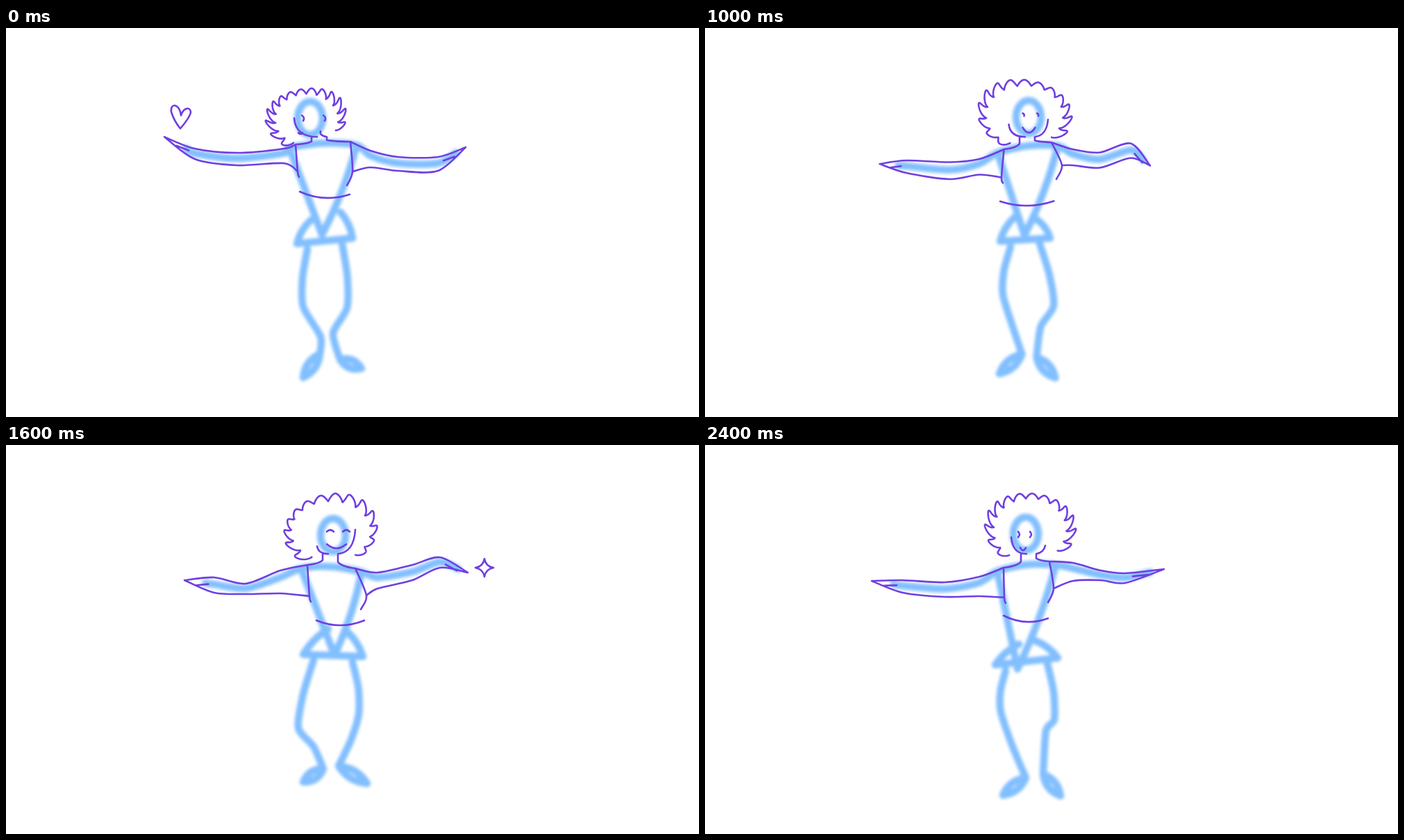
An HTML page with a canvas for the animation above (2600 ms loop, 998x561 px).

```html
<!DOCTYPE html>
<html lang="en">
<head>
<meta charset="utf-8">
<title>Dancer</title>
<style>
html, body { margin: 0; width: 100%; height: 100%; overflow: hidden; background: #fff; }
canvas { display: block; }
</style>
</head>
<body>
<canvas id="stage" width="998" height="561"></canvas>
<script>
const ctx = document.getElementById('stage').getContext('2d');
const STEP = 200, STEPS = 13, CURLS = 14, CHIN = 157;
const BLUE = '#82bfff', PURPLE = '#6f3fe0';
const HEART = new Path2D('M252,126 C250,108 236,108 238,121 Q242,134 251,145 Q264,130 266,122 C266,113 256,114 252,126');

// Rig of one pose. hair: x, y, rx, ry, first and last angle; eyes: two x, y, half width, half height;
// mouth: x, y, half width, sag; waist: two ends, sag; leg: knee, calf, ankle, toe;
// arm: from the shoulder out, where each section is x, top, bottom.
const POSES = [{
  head: [438, 130], hair: [433, 132, 50, 42, 115, 385], neck: 451,
  eyes: [427, 458, 130, 1, 4], mouth: [424, 151, 3, 2], jaw: [[415, 130], [453, 149]],
  waist: [[423, 236], [495, 240], 7], point: [455, 298],
  skirt: [[439, 277], [419, 311], [499, 303], [482, 266]],
  legs: [[[428, 402], [453, 445], [452, 470], [428, 504]], [[491, 404], [471, 440], [481, 478], [512, 491]]],
  arms: [
    { collar: [417, 168], pit: [420, 207], parts: [[400, 174, 195], [333, 180, 198], [272, 174, 189]], tip: [228, 157] },
    { collar: [496, 164], pit: [499, 207], parts: [[525, 177, 201], [565, 186, 206], [622, 186, 206]], tip: [662, 172] }]
}, {
  head: [447, 130], hair: [455, 130, 60, 46, 126, 417], neck: 463,
  eyes: [446, 471, 129, 5, 0], mouth: [461, 147, 6, 3], jaw: [[430, 128], [482, 146]],
  waist: [[416, 239], [493, 252], 15], point: [454, 294],
  skirt: [[440, 268], [421, 317], [502, 313], [476, 264]],
  legs: [[[428, 380], [447, 422], [456, 475], [421, 505]], [[502, 380], [490, 412], [481, 481], [505, 505]]],
  arms: [
    { collar: [425, 174], pit: [415, 208], parts: [[375, 168, 188], [325, 172, 194], [280, 179, 204]], tip: [253, 208] },
    { collar: [504, 182], pit: [507, 213], parts: [[530, 184, 203], [570, 188, 207], [605, 190, 206]], tip: [655, 170] }]
}, {
  head: [461, 127], hair: [455, 126, 62, 47, 113, 398], neck: 463,
  eyes: [446, 471, 124, 1, 0], mouth: [461, 142, 6, 7], jaw: [[430, 131], [489, 136]],
  waist: [[421, 249], [501, 249], 2], point: [453, 301],
  skirt: [[437, 277], [421, 309], [497, 306], [470, 271]],
  legs: [[[430, 377], [447, 420], [457, 465], [432, 493]], [[505, 394], [488, 428], [485, 478], [505, 504]]],
  arms: [
    { collar: [430, 170], pit: [424, 213], parts: [[395, 187, 207], [355, 192, 215], [290, 188, 207]], tip: [251, 197] },
    { collar: [499, 162], pit: [511, 195], parts: [[530, 179, 205], [565, 195, 213], [622, 190, 203]], tip: [662, 212] }]
}, {
  head: [471, 130], hair: [465, 126, 58, 49, 111, 415], neck: 465,
  eyes: [471, 487, 126, 1, 4], mouth: [472, 145, 12, 8], jaw: [[445, 147], [499, 128]],
  waist: [[429, 251], [504, 250], 11], point: [467, 297],
  skirt: [[455, 268], [429, 306], [497, 300], [484, 280]],
  legs: [[[428, 392], [436, 432], [456, 476], [416, 504]], [[499, 408], [479, 433], [470, 472], [504, 505]]],
  arms: [
    { collar: [431, 180], pit: [430, 218], parts: [[395, 191, 216], [350, 195, 221], [290, 194, 211]], tip: [252, 195] },
    { collar: [499, 168], pit: [517, 201], parts: [[530, 171, 191], [572, 164, 190], [604, 143, 172]], tip: [620, 185] }]
}, {
  head: [471, 130], hair: [468, 124, 62, 48, 119, 413], neck: 467,
  eyes: [467, 490, 125, 5, 0], mouth: [476, 143, 14, 6], jaw: [[448, 146], [503, 122]],
  waist: [[447, 253], [516, 253], 7], point: [473, 303],
  skirt: [[464, 265], [428, 302], [514, 305], [490, 268]],
  legs: [[[421, 408], [443, 435], [457, 467], [428, 486]], [[508, 388], [497, 425], [479, 463], [520, 488]]],
  arms: [
    { collar: [434, 173], pit: [437, 218], parts: [[395, 181, 214], [345, 200, 215], [300, 191, 213]], tip: [257, 195] },
    { collar: [503, 178], pit: [519, 217], parts: [[535, 184, 207], [585, 173, 195], [625, 162, 177]], tip: [665, 184] }]
}, {
  head: [473, 130], hair: [468, 126, 58, 51, 128, 402], neck: 471,
  eyes: [457, 480, 129, 0, 3], mouth: [470, 147, 9, 4], jaw: [[438, 139], [492, 146]],
  waist: [[436, 253], [514, 251], 6], point: [465, 303],
  skirt: [[455, 278], [425, 307], [502, 306], [485, 283]],
  legs: [[[426, 382], [438, 420], [455, 480], [422, 504]], [[499, 390], [484, 405], [480, 470], [511, 506]]],
  arms: [
    { collar: [435, 181], pit: [431, 223], parts: [[395, 194, 220], [355, 199, 228], [295, 186, 210]], tip: [241, 209] },
    { collar: [501, 167], pit: [519, 209], parts: [[530, 170, 198], [570, 165, 187], [612, 161, 182]], tip: [656, 205] }]
}, {
  head: [462, 128], hair: [468, 122, 57, 50, 125, 402], neck: 466,
  eyes: [451, 468, 129, 0, 4], mouth: [458, 148, 4, 4], jaw: [[441, 133], [490, 145]],
  waist: [[430, 246], [494, 250], 7], point: [450, 323],
  skirt: [[452, 287], [418, 317], [508, 307], [475, 282]],
  legs: [[[426, 385], [443, 435], [462, 480], [429, 505]], [[503, 396], [491, 412], [487, 475], [512, 506]]],
  arms: [
    { collar: [430, 177], pit: [431, 220], parts: [[395, 190, 218], [345, 198, 219], [285, 195, 213]], tip: [240, 196] },
    { collar: [496, 168], pit: [502, 207], parts: [[530, 170, 196], [570, 181, 195], [605, 185, 199]], tip: [661, 179] }]
}];
// step: x, y, radius
const STARS = { 6: [649, 174, 3], 7: [690, 177, 34], 8: [689, 177, 13], 9: [682, 179, 3] };

// blends numbers, lists and whole rigs alike
function mix(a, b, t) {
  if (typeof a === 'number') return a + (b - a) * t;
  if (Array.isArray(a)) return a.map((v, i) => mix(v, b[i], t));
  return Object.fromEntries(Object.keys(a).map(k => [k, mix(a[k], b[k], t)]));
}

const add = (p, x, y) => [p[0] + x, p[1] + y];
const side = i => i ? 1 : -1;

function line(...pts) {
  pts.forEach((p, i) => i ? ctx.lineTo(...p) : ctx.moveTo(...p));
}

function quad(a, c, b) {
  ctx.moveTo(...a);
  ctx.quadraticCurveTo(...c, ...b);
}

// arc from a to b whose middle leaves the chord by k
function bow(a, b, k) {
  const dx = b[0] - a[0], dy = b[1] - a[1], s = 2 * k / Math.hypot(dx, dy);
  quad(a, add(mix(a, b, 0.5), -dy * s, dx * s), b);
}

// smooth curve through all points
function curve(pts, k = 0.15) {
  const at = i => pts[Math.max(0, Math.min(pts.length - 1, i))];
  const pull = (p, from, to) => add(p, (to[0] - from[0]) * k, (to[1] - from[1]) * k);
  ctx.moveTo(...pts[0]);
  for (let i = 0; i < pts.length - 1; i++) {
    const a = at(i), b = at(i + 1);
    ctx.bezierCurveTo(...pull(a, at(i - 1), b), ...pull(b, at(i + 2), a), ...b);
  }
}

// shoulder to hand, through the sections
function bone(arm, i) {
  const inner = arm.parts.map(([x, top, low], n) => [x, mix(top, low, n ? 0.45 : 0.3)]);
  return [add(arm.collar, side(i) * 9, 5), ...inner, mix(inner[2], arm.tip, i ? 0.65 : 0.3)];
}

function sketch({ head, arms, point, skirt, legs }) {
  ctx.moveTo(head[0] + 18, head[1]);
  ctx.ellipse(...head, 18, 24, 0, 0, 2 * Math.PI);
  const [left, right] = arms.map(bone);
  const mid = add(mix(left[0], right[0], 0.5), 0, -5);
  curve([...left.reverse(), mid, ...right]);
  bow(left[left.length - 1], point, 0);
  bow(point, right[0], 4);
  bow(skirt[0], skirt[1], 3);
  line(skirt[1], skirt[2]);
  bow(skirt[2], skirt[3], 3);
  legs.forEach(([knee, calf, ankle, toe], i) => {
    const hip = add(skirt[1 + i], -side(i) * 15, 8);
    const thigh = add(mix(hip, knee, 0.5), side(i) * 4, 0);
    curve([hip, thigh, knee, calf, ankle], 0.12);
    bow(ankle, toe, 6);
    bow(ankle, toe, -6);
  });
}

function hair([x, y, rx, ry, from, to], seed) {
  for (let u = 0; u <= 1; u += 0.002) {
    const a = mix(from, to, u) * Math.PI / 180, turn = u * CURLS;
    const size = 1 + 0.3 * Math.sin(Math.floor(turn) * 7 + seed);
    const wave = Math.abs(Math.sin(Math.PI * turn)) * size;
    const out = 10 * wave - 5, slip = -8 * wave * wave * Math.cos(a);
    const p = [x + (rx + out) * Math.cos(a) - slip * Math.sin(a), y + (ry + out) * Math.sin(a) + slip * Math.cos(a)];
    u ? ctx.lineTo(...p) : ctx.moveTo(...p);
  }
}

function face({ neck, jaw: [l, r], eyes: [x1, x2, y, w, h], mouth: [mx, my, mw, sag] }) {
  for (const x of [x1, x2]) quad([x - w, y - h], [x + h, y - w], [x + w, y + h]);
  bow([mx - mw, my], [mx + mw, my], sag);
  quad(l, [l[0] + 2, CHIN], [neck - 3, CHIN]);
  quad([neck + 11, CHIN], [r[0] - 2, CHIN - 2], r);
}

function sleeve({ collar, pit, parts, tip }, i, neck) {
  const top = parts.map(p => [p[0], p[1]]), low = parts.map(p => [p[0], p[2]]);
  const x = neck + side(i) * 11, y = mix(CHIN, collar[1], 0.5) + 1;
  line([x, CHIN], [x, y]);
  quad([x, y], [x + side(i) * 4, mix(y, collar[1], 0.7)], collar);
  curve([collar, ...top, tip]);
  curve([pit, ...low, tip]);
  line(mix(tip, low[2], 0.4), mix(tip, mix(top[2], low[2], 0.5), 0.8));
  curve([collar, pit, add(pit, i ? -8 : 2, i ? 20 : 8)]);
}

function star(x, y, r) {
  ctx.moveTo(x, y - r);
  for (let i = 1; i <= 4; i++) {
    const a = i * Math.PI / 2, m = a - Math.PI / 4, k = r * 0.2;
    ctx.quadraticCurveTo(x + k * Math.sin(m), y - k * Math.cos(m), x + r * Math.sin(a), y - r * Math.cos(a));
  }
}

function ink(color, width, blur, trace) {
  ctx.strokeStyle = color;
  ctx.lineWidth = width;
  ctx.filter = blur ? `blur(${blur}px)` : 'none';
  ctx.beginPath();
  trace();
  ctx.stroke();
}

function draw(n) {
  const i = n >> 1;
  const pose = n % 2 ? mix(POSES[i], POSES[i + 1], 0.5) : POSES[i];
  ctx.filter = 'none';
  ctx.fillStyle = '#fff';
  ctx.fillRect(0, 0, 998, 561);
  ctx.lineCap = ctx.lineJoin = 'round';
  ink(BLUE, 10.5, 2, () => sketch(pose));
  ink(PURPLE, 2.6, 0, () => {
    hair(pose.hair, n);
    face(pose);
    pose.arms.forEach((arm, k) => sleeve(arm, k, pose.neck));
    bow(...pose.waist);
    if (STARS[n]) star(...STARS[n]);
  });
  if (n === 0) ctx.stroke(HEART);
}

let shown = -1;
const start = performance.now();
function tick() {
  const n = Math.floor((performance.now() - start) / STEP) % STEPS;
  if (n !== shown) draw(shown = n);
  requestAnimationFrame(tick);
}
tick();
</script>
</body>
</html>
```
